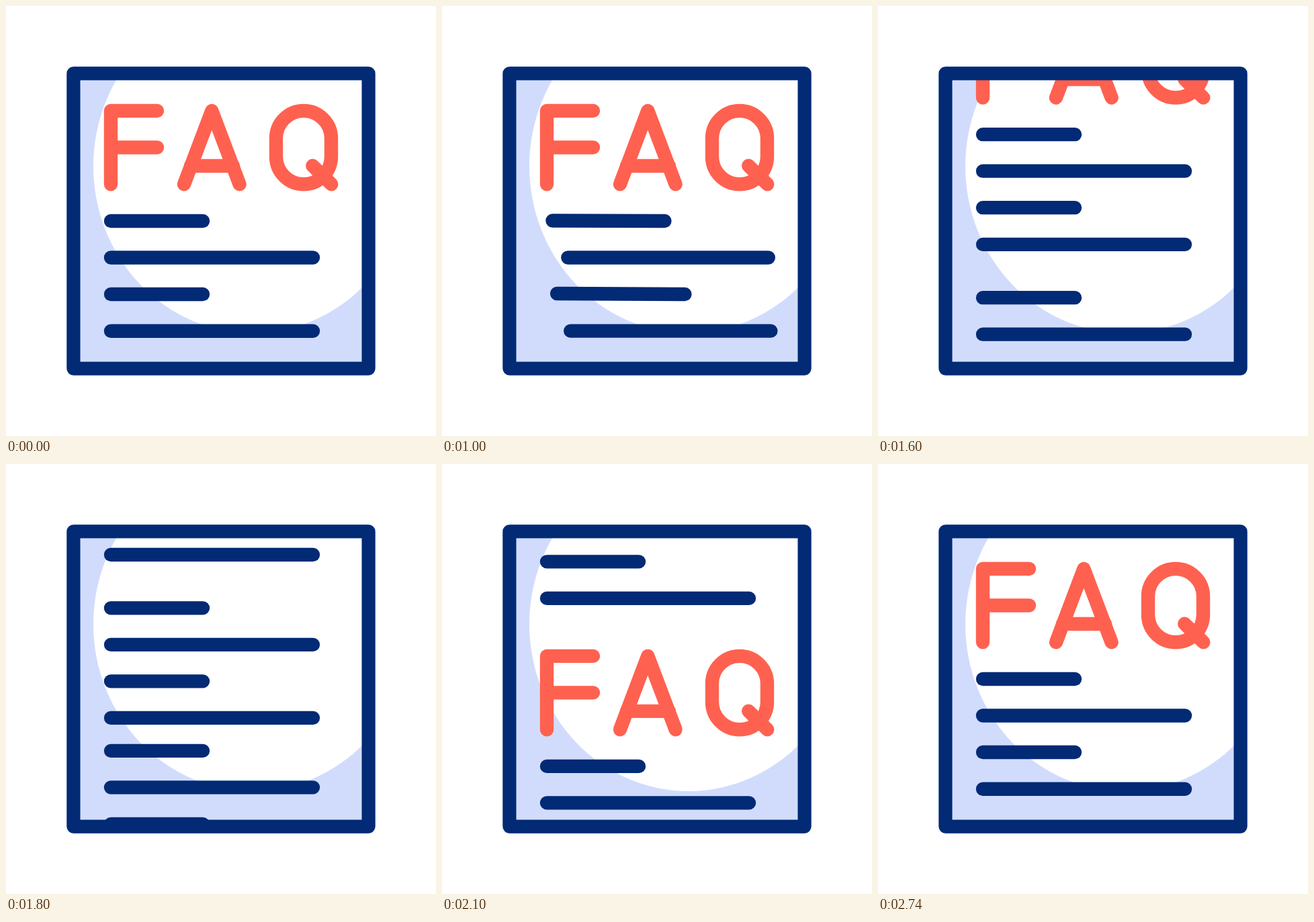
Animation of 640x640 px, one loop 3 s. Source, as an HTML page with a canvas:

```html
<!DOCTYPE html>
<html lang="en">
<head>
<meta charset="utf-8">
<title>FAQ page</title>
<style>
  html, body { margin: 0; width: 100%; height: 100%; overflow: hidden; background: #fff; }
  canvas { display: block; width: 100vmin; height: 100vmin; margin: 0 auto; }
</style>
</head>
<body>
<canvas id="stage" width="640" height="640"></canvas>
<script>
const ctx = document.getElementById('stage').getContext('2d');
const LOOP = 3000;
const NAVY = '#022a75', PALE = '#d1dcfd', CORAL = '#ff6150', GOLD = '#ffcc50';
const PAGE = 869;            // distance scrolled in one loop
const SHORT = 293, LONG = 457;

const clamp = v => Math.min(1, Math.max(0, v));
const smooth = u => u * u * (3 - 2 * u);
const ramp = (t, start, span) => smooth(clamp((t - start) / span));

// cubic-bezier(x1, 0, x2, 1)
function bezier(p, x1, x2) {
  let lo = 0, hi = 1;
  for (let i = 0; i < 30; i++) {
    const u = (lo + hi) / 2, v = 1 - u;
    const x = 3 * u * v * v * x1 + 3 * u * u * v * x2 + u ** 3;
    if (x < p) lo = u; else hi = u;
  }
  return smooth((lo + hi) / 2);
}

function polyline(...pts) {
  const path = new Path2D();
  let length = 0;
  pts.forEach(([x, y], i) => {
    if (i) {
      path.lineTo(x, y);
      length += Math.hypot(x - pts[i - 1][0], y - pts[i - 1][1]);
    } else path.moveTo(x, y);
  });
  return { path, length };
}

function ring(x, top, bottom, r) {
  const path = new Path2D();
  path.arc(x, bottom, r, Math.PI / 2, Math.PI);
  path.arc(x, top, r, Math.PI, 2 * Math.PI);
  path.arc(x, bottom, r, 0, Math.PI / 2);
  return { path, length: 2 * Math.PI * r + 2 * (bottom - top) };
}

// Letter strokes, in the order the highlight runs through them
const strokes = [
  polyline([156, 265.3], [156, 156], [225, 156]),
  polyline([156, 210.5], [225, 210.5]),
  polyline([265, 265.3], [306.3, 156], [347.6, 265.3]),
  polyline([275, 238], [338, 238]),
  ring(443, 197, 224.3, 41),
  polyline([456.3, 237.8], [484.3, 265.3])
];

// Moving lines: y, right end, out start, back start, back span
const movers = [
  [320, SHORT, 42, 647, 720],
  [374.5, LONG, 65, 882, 483],
  [429, SHORT, 140, 913, 483],
  [483.7, LONG, 270, 937, 483]
];

const still = [563, 617.5, 672, 726.5, 775.5, 830, 884.5, 939];

function bar(x1, y1, x2, y2) {
  ctx.beginPath();
  ctx.moveTo(x1, y1);
  ctx.lineTo(x2, y2);
  ctx.stroke();
}

function letters() {
  ctx.strokeStyle = CORAL;
  ctx.lineWidth = 20.4;
  strokes.forEach(s => ctx.stroke(s.path));
}

function highlight(t) {
  ctx.strokeStyle = GOLD;
  ctx.lineWidth = 23;
  strokes.forEach(({ path, length }, i) => {
    const delay = i * 73;
    const from = ramp(t, 331 + delay, 155);
    const to = ramp(t, 35 + delay, 350);
    if (to <= from) return;
    ctx.setLineDash([length * (to - from), length * 2]);
    ctx.lineDashOffset = -length * from;
    ctx.stroke(path);
  });
  ctx.setLineDash([]);
}

function textLines(t) {
  ctx.strokeStyle = NAVY;
  ctx.lineWidth = 20.4;
  for (const [y, end, out, back, span] of movers) {
    const k = ramp(t, out, 500) - ramp(t, back, span);
    const isShort = end === SHORT;
    const left = isShort ? 16.5 : 37, right = isShort ? 75 : 34;
    bar(156 + left * k, y - (isShort ? k : 0), end + right * k, y);
  }
  still.forEach((y, i) => bar(156, y, i % 2 ? LONG : SHORT, y));
  movers.forEach(([y, end]) => bar(156, y + PAGE, end, y + PAGE));
}

function draw(t) {
  ctx.fillStyle = '#fff';
  ctx.fillRect(0, 0, 640, 640);
  ctx.fillStyle = PALE;
  ctx.fillRect(100, 100, 440, 440);

  ctx.save();
  ctx.beginPath();
  ctx.rect(110, 110, 420, 420);
  ctx.clip();
  ctx.fillStyle = '#fff';
  ctx.beginPath();
  ctx.ellipse(367, 238.5, 237, 248.5, 0, 0, 2 * Math.PI);
  ctx.fill();

  ctx.lineCap = ctx.lineJoin = 'round';
  const scroll = PAGE * bezier(clamp((t - 985) / 1755), 0.725, 0.253);
  ctx.translate(0, -scroll);
  letters();
  highlight(t);
  textLines(t);
  ctx.translate(0, PAGE);
  letters();
  ctx.restore();

  ctx.lineJoin = 'round';
  ctx.strokeStyle = NAVY;
  ctx.lineWidth = 20.2;
  ctx.strokeRect(100.4, 100.4, 439.2, 439.2);
}

const origin = performance.now();
function tick() {
  draw((performance.now() - origin) % LOOP);
  requestAnimationFrame(tick);
}
tick();
</script>
</body>
</html>
```
